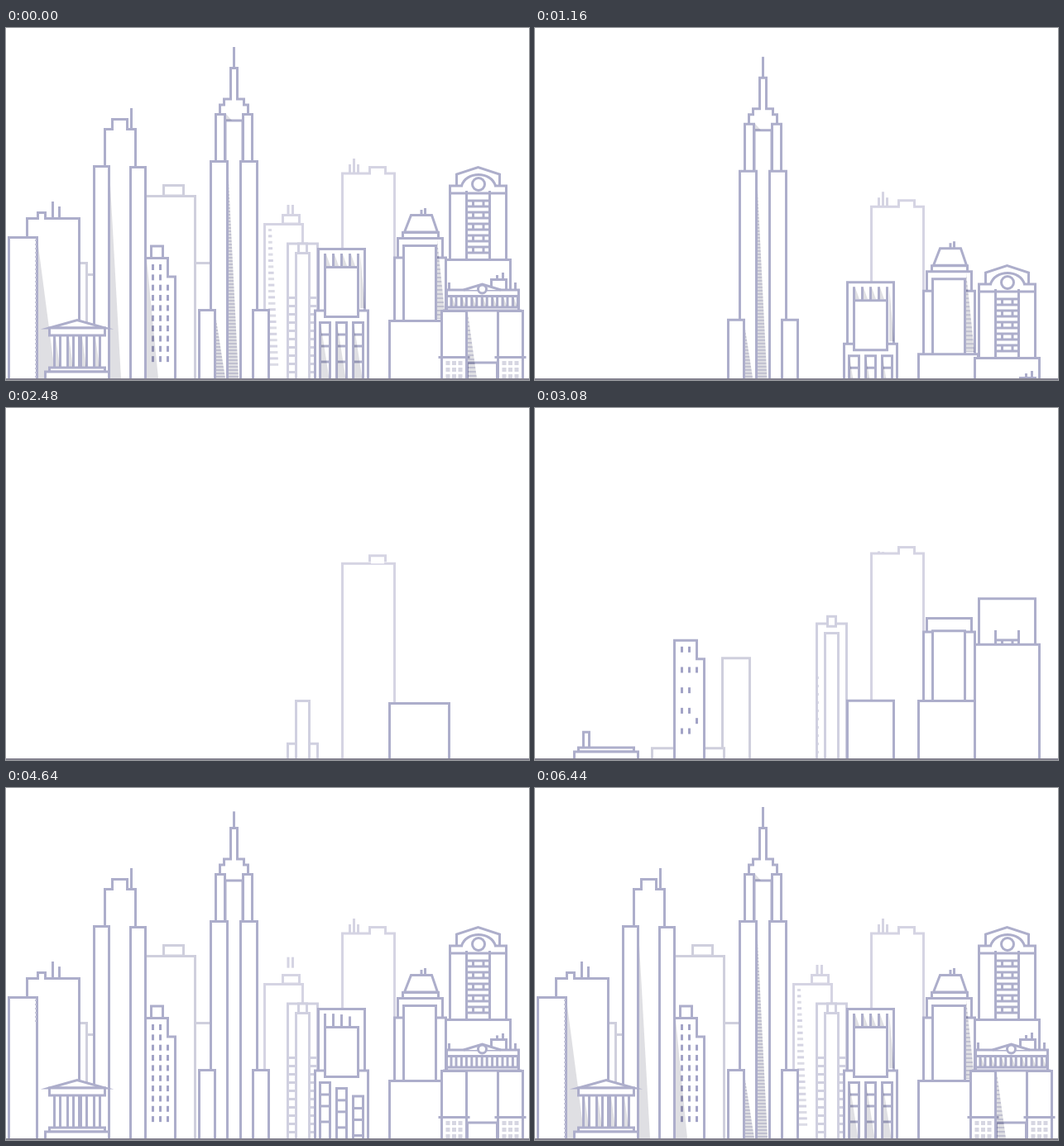
Animation of 632x426 px, one loop 9.12 s. Source, as an HTML page with a canvas:

```html
<!DOCTYPE html>
<html lang="en">
<head>
<meta charset="utf-8">
<title>Skyline</title>
<style>
html, body { margin: 0; width: 100%; height: 100%; overflow: hidden; background: #fff; }
canvas { display: block; }
</style>
</head>
<body>
<canvas id="stage" width="632" height="426"></canvas>
<script>
const ctx = document.getElementById('stage').getContext('2d');
const LOOP = 9120, BUILD = 2080, GROUND = 424;
const DARK = '#adaecb', LIGHT = '#cfcfdd', PALE = '#d5d4e3', SHADE = '#dfdfe3';

// Exit order of each block: start time and distance to sink
const exits = {
  left: [0, 220], west: [166, 332], centre: [332, 216], temple: [332, 74],
  east: [503, 260], mid: [664, 270], spire: [830, 404]
};
const parts = [];
let group, color;

const clamp = v => Math.max(0, Math.min(1, v));
const use = (g, c = DARK) => { group = g; color = c; };

// Part that rises by `dist` from time `start`; `back` sets the overshoot
function add(start, dist, draw, back = 0, T = 600) {
  parts.push({ group, color, start, dist, draw, back, T });
}

function poly(pts, close) {
  ctx.beginPath();
  for (let i = 0; i < pts.length; i += 2) ctx.lineTo(pts[i], pts[i + 1]);
  if (close) ctx.closePath();
  ctx.fill();
  ctx.stroke();
}
const rect = (x0, x1, y0, y1) => poly([x0, y0, x1, y0, x1, y1, x0, y1], true);
const hline = (x0, x1, y) => poly([x0, y, x1, y]);
const vline = (x, y0, y1) => poly([x, y0, x, y1]);
const circle = (x, y, r) => {
  ctx.beginPath();
  ctx.arc(x, y, r, 0, 7);
  ctx.fill();
  ctx.stroke();
};

// Tower standing on the ground, and a roof piece that slides out of a block
const tower = (start, x0, x1, top, back) =>
  add(start, GROUND + 2 - top, () => rect(x0, x1, top, 900), back);
const roof = (start, x0, x1, top, bottom) =>
  add(start, bottom - top + 2, () => rect(x0, x1, top, bottom));
const mast = (start, x, top, bottom, dist = bottom - top + 2, back = 0) =>
  add(start, dist, () => vline(x, top, bottom), back);

// Triangular shadow revealed from the top, with optional stripes
function shadow(start, T, x0, y0, x1, y1, pitch) {
  add(start, 0, t => {
    const p = clamp((t - start) / T);
    ctx.beginPath();
    ctx.rect(0, 0, 632, y0 + (y1 - y0) * p);
    ctx.clip();
    ctx.beginPath();
    ctx.moveTo(x0, y0);
    ctx.lineTo(x0, y1);
    ctx.lineTo(x1, y1);
    ctx.closePath();
    ctx.globalCompositeOperation = 'multiply';
    ctx.fillStyle = SHADE;
    ctx.fill();
    if (!pitch) return;
    ctx.clip();
    ctx.fillStyle = '#dcdcea';
    for (let y = y0; y < y1; y += pitch) ctx.fillRect(x0 - 2, y, 40, 2);
  });
}

// Pale towers behind
use('mid', PALE);
mast(3000, 415.5, 165, 176);
mast(3040, 420.5, 158, 176);
mast(3080, 425.5, 165, 176);
tower(2100, 406.5, 469.5, 176);
add(2450, 12, () => poly([439.5, 176, 439.5, 168.5, 458.5, 168.5, 458.5, 176]));
add(2450, 12, () => { ctx.fillRect(441, 174, 16, 4); });

use('west', LIGHT);
tower(3711, 80, 112, 298.5);
tower(3711, 80, 97.5, 284.5);
tower(2784, 226.5, 259.5, 284.5);
roof(3400, 190.5, 214.5, 190.5, 203);
tower(3068, 141.5, 228.5, 203.5);

use('centre', PALE);
mast(4300, 341, 214, 227, 200, 1.2);
mast(4300, 346.5, 214, 227, 200, 1.2);
roof(4050, 334.5, 354.5, 226.5, 237);
tower(3889, 312.5, 358.5, 237.5);
add(4900, 0, t => {
  const shown = 23 * clamp((t - 4900) / 1400);
  for (let i = 0; i < shown; i++) {
    ctx.fillStyle = i % 2 ? PALE : '#dcdce6';
    ctx.fillRect(317, 243 + i * 7.4, 4 + i * .37, 3);
  }
});
use('centre', '#d0d0e0');
tower(2456, 340.5, 376.5, 261);
add(3040, 0, t => {
  const w = 9 * clamp((t - 3040) / 500);
  ctx.fillStyle = '#d0d0e0';
  for (let y = 325; y < 420; y += 10) {
    ctx.fillRect(342, y, w, 3);
    ctx.fillRect(376 - w, y, w, 3);
  }
});
add(2700, 166, () => rect(353.5, 363.5, 261, 273), 1.2);
tower(2368, 350.5, 366.5, 272.5);

// Block with flat screen and three window columns
use('mid');
tower(2972, 377.5, 433.5, 267.5);
for (let i = 0; i < 5; i++) mast(i < 4 ? 4050 + i * 110 : 4750, 385.5 + i * 10, 273, 290);
for (let i = 0; i < 4; i++) shadow(5000 + i * 100, 500, 387 + i * 10, 274, 392 + i * 10, 288);
shadow(5200, 800, 428, 273, 434, 339);
tower(3564, 373.5, 437.5, 342);
add(3300, 138, () => rect(385.5, 425.5, 289.5, 349.5));
[3894, 4318, 4412].forEach((start, i) => {
  const x = 379.5 + i * 20;
  add(start, 70, () => {
    rect(x, x + 12, 356.5, 900);
    for (const y of [371, 385, 404]) hline(x, x + 12, y);
  });
  shadow(4900 + i * 200, 900, x + 1, 360, x + 11, 424);
});

// Stepped tower with lantern
mast(3500, 502, 220, 227);
mast(3560, 506.5, 218, 227);
add(3250, 30, () => poly([481.5, 247, 489.5, 226.5, 514.5, 226.5, 521.5, 247], true));
roof(3100, 479.5, 522.5, 247.5, 255);
tower(2450, 473.5, 527.5, 254.5);
tower(2740, 469.5, 531.5, 278, 1.2);
tower(2684, 480.5, 519.5, 263.5);
shadow(5000, 900, 521, 256, 531, 352, 5);
tower(2090, 463.5, 535.5, 354.5);

// Clock tower
use('east');
add(3200, 28, () => poly([544.5, 192, 544.5, 177, 570.5, 168.5, 596.5, 177, 596.5, 192]));
tower(2813, 536.5, 604.5, 191);
add(3300, 14, () => {
  ctx.fillRect(552, 188, 38, 7);
  ctx.beginPath();
  ctx.moveTo(550.5, 191);
  ctx.bezierCurveTo(556, 173, 586, 173, 591.5, 191);
  ctx.stroke();
  circle(571, 189, 7.5);
});
add(3150, 80, () => hline(537, 604, 200));
add(3060, 80, () => {
  vline(556.5, 197, 290);
  vline(584.5, 197, 290);
  for (let y = 209; y < 272; y += 14) {
    hline(557, 584, y);
    hline(557, 584, y + 7);
    vline(564.5, y, y + 7);
    vline(577, y, y + 7);
  }
});
tower(2684, 531.5, 609.5, 280.5);

// Station
mast(4250, 593.5, 299, 306);
mast(4300, 600.5, 296, 306);
roof(4150, 586.5, 604.5, 304.5, 318);
mast(4300, 535.5, 308, 318);
mast(4300, 615.5, 308, 318);
add(3606, 110, () => {
  rect(532.5, 619.5, 317, 900);
  poly([553, 317, 575.5, 310, 598, 317]);
  hline(532, 620, 324.5);
});
add(4050, 8, () => circle(575.5, 316, 5));
add(4150, 16, () => {
  for (let i = 0; i < 7; i++) {
    const x = 538 + i * 12.4;
    vline(x, 325, 338);
    vline(x + 6, 325, 338);
  }
});
for (let i = 0; i < 7; i++) shadow(4900 + i * 60, 400, 539 + i * 12.4, 326, 544 + i * 12.4, 338);
add(3606, 88, () => { hline(530, 621, 338); hline(528, 623, 342); });
add(3900, 22, () => rect(557.5, 593.5, 405, 900));
[[3711, 526.5, 556.5], [4000, 594.5, 624.5]].forEach(([start, x0, x1]) =>
  add(start, 84, () => {
    rect(x0, x1, 342.5, 900);
    hline(x0 - 4, x1 + 4, 398.5);
    ctx.fillStyle = '#d6d6e2';
    for (let i = 0; i < 9; i++)
      ctx.fillRect(x0 + 5 + i % 3 * 7.5, 403 + Math.floor(i / 3) * 8, 5, 5);
  }));
shadow(5300, 1100, 558, 345, 569, 424, 5);

// West side
use('left');
mast(4100, 56.5, 210, 231);
mast(4160, 64.5, 216, 231);
add(3547, 204, () => {
  rect(25.5, 88.5, 230.5, 900);
  rect(38.5, 47.5, 223.5, 230.5);
  ctx.fillRect(40, 228, 6, 5);
});
shadow(4580, 1840, 38, 256, 60, 424);
tower(3530, 3.5, 37.5, 253.5);
add(4500, 0, t => {
  const end = 256 + 166 * clamp((t - 4500) / 800);
  ctx.fillStyle = '#c5c5d9';
  for (let y = 256; y < end; y += 5) ctx.fillRect(35, y, 2, 2);
});

use('west');
mast(3890, 151.5, 97, 123, 60);
add(3599, 318, () => {
  rect(119.5, 156.5, 122.5, 900);
  rect(128.5, 146.5, 110.5, 122.5);
  ctx.fillRect(130, 120, 15, 5);
});
shadow(5000, 1300, 126, 190, 139, 424);
tower(3660, 106.5, 124.5, 167.5);
tower(3758, 150.5, 168.5, 168.5);
roof(3300, 175.5, 189.5, 264, 279);
add(2640, 148, t => {
  poly([168.5, 900, 168.5, 278.5, 195.5, 278.5, 195.5, 301, 204.5, 301, 204.5, 900]);
  ctx.fillStyle = '#a2a3c6';
  for (let r = 0; r < 10; r++) for (let c = 0; c < 3; c++) {
    if (c === 2 && r < 2) continue;
    const early = c < 2 ? r % 2 === 0 : r % 5 === 2;
    if (t > (early ? 2800 : 3200 + r * 50)) ctx.fillRect(176 + c * 9, 286 + r * 12.35, 3, 7);
  }
});
shadow(5100, 1100, 170, 280, 184, 424);

// Tall tower with spire
use('spire');
mast(4400, 275.5, 23, 50, 25);
add(3871, 315, () => {
  rect(265, 286, 112, 900);
  poly([258.5, 104, 258.5, 93, 263.5, 93, 263.5, 86, 271.5, 86, 271.5, 48.5,
    279.5, 48.5, 279.5, 86, 287.5, 86, 287.5, 93, 292.5, 93, 292.5, 104]);
  ctx.fillRect(265, 104, 21, 6);
});
shadow(5200, 400, 265, 103, 273, 112);
tower(3795, 253.5, 264.5, 104.5);
tower(3850, 286.5, 297.5, 104.5);
shadow(5640, 800, 268, 165, 281, 424, 4);
tower(3743, 247.5, 267.5, 161.5);
tower(3683, 283.5, 303.5, 161.5);
shadow(5400, 900, 254, 353, 265, 424, 4);
tower(3820, 233.5, 252.5, 341.5);
tower(3664, 298.5, 317.5, 341.5);

// Temple
use('temple');
for (let i = 0; i < 4; i++) {
  const x = 58.5 + i * 16;
  add(2960 + i * 140, 42, () => rect(x, x + 7, 371, 412));
}
for (let i = 0; i < 4; i++) shadow(5000 + i * 100, 700, 60 + i * 16, 374, 65 + i * 16, 410);
add(3798, 74, () => {
  poly([52.5, 363, 86, 353.5, 119.5, 363], true);
  rect(52.5, 119.5, 363, 372);
});
add(2520, 16, () => {
  rect(52.5, 119.5, 411, 416);
  rect(47.5, 124.5, 416, 900);
});

function rise(part, t) {
  const v = clamp((t - part.start) / part.T) - 1;
  return 1 + (part.back + 1) * v * v * v + part.back * v * v;
}

function render(time) {
  ctx.fillStyle = '#fff';
  ctx.fillRect(0, 0, 632, 426);
  const leaving = time < BUILD;
  const t = leaving ? 1e5 : time;
  for (const part of parts) {
    if (t <= part.start) continue;
    const [start, depth] = exits[part.group];
    const u = leaving ? clamp((time - start) / 800) : 0;
    if (u === 1) continue;
    ctx.save();
    ctx.beginPath();
    ctx.rect(0, 0, 632, GROUND);
    ctx.clip();
    ctx.translate(0, depth * u ** 4 + part.dist * (1 - rise(part, t)));
    ctx.fillStyle = '#fff';
    ctx.strokeStyle = part.color;
    ctx.lineWidth = 3;
    part.draw(t);
    ctx.restore();
  }
  ctx.fillStyle = '#84828f';
  ctx.fillRect(0, GROUND, 632, 2);
}

const began = performance.now();
function frame() {
  render((performance.now() - began) % LOOP);
  requestAnimationFrame(frame);
}
frame();
</script>
</body>
</html>
```
